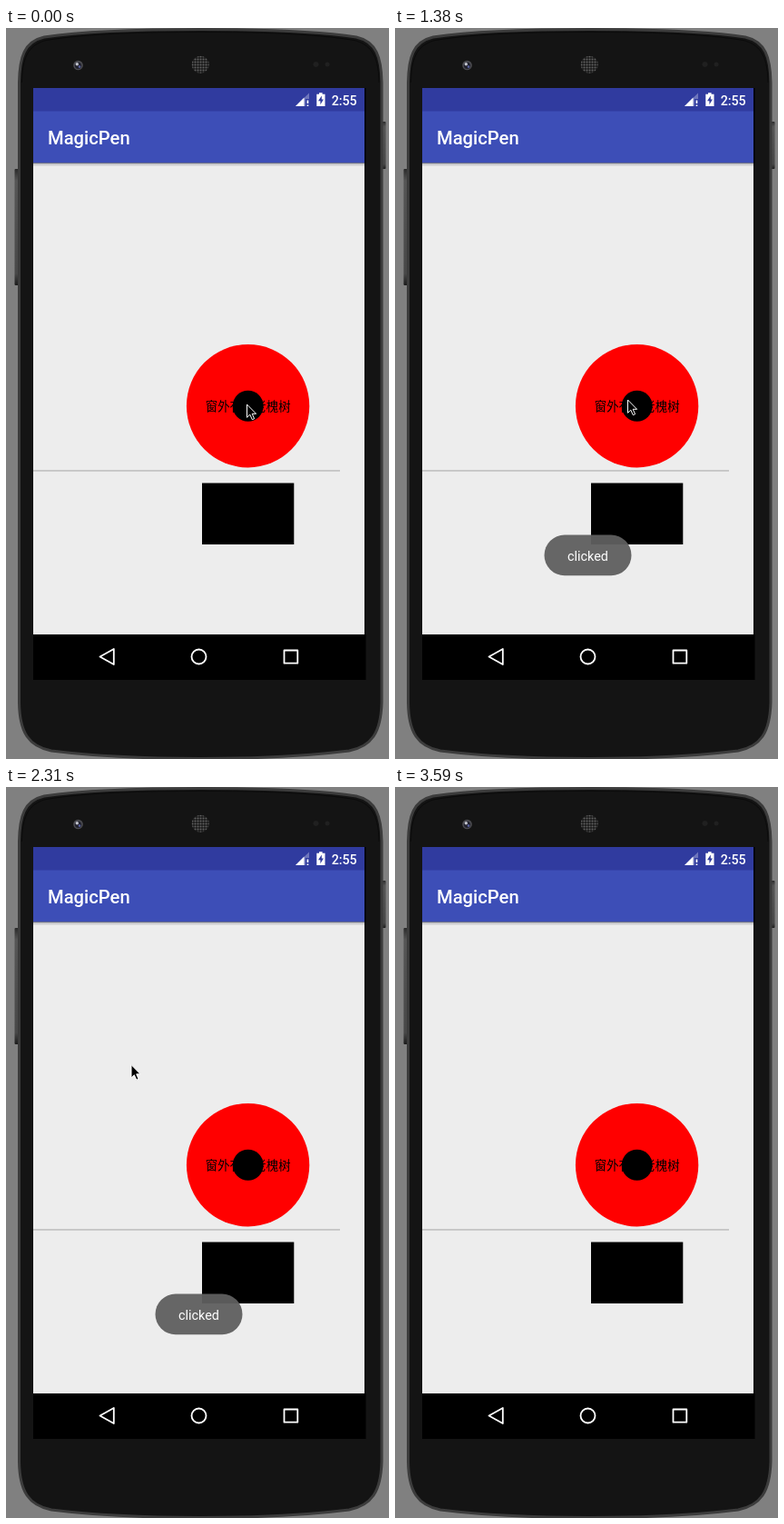
Write an HTML page that moves like this. It is 422x804 px and loops after 4.08 s.

```html
<!DOCTYPE html>
<html lang="zh-CN">
<head>
<meta charset="utf-8">
<title>MagicPen</title>
<style>
html, body { margin: 0; width: 100%; height: 100%; overflow: hidden; background: #808080; }
svg { display: block; width: 100vw; height: 100vh; }
text { font-family: Roboto, sans-serif; fill: #fff; }
.label { font-family: "Noto Sans CJK SC", "Noto Sans CJK", sans-serif; font-size: 13.4px; fill: #000; }
.icon { fill: none; stroke: #fff; stroke-width: 1.8; stroke-linejoin: round; }
</style>
</head>
<body>
<svg viewBox="0 0 422 804" preserveAspectRatio="none">
  <defs>
    <linearGradient id="shade" x2="0" y2="1">
      <stop offset="0" stop-color="#b2b2b6"/>
      <stop offset="1" stop-color="#ededed"/>
    </linearGradient>
    <linearGradient id="key" x2="0" y2="1">
      <stop offset="0" stop-color="#2a2a2a"/>
      <stop offset=".1" stop-color="#555"/>
      <stop offset=".9" stop-color="#484848"/>
      <stop offset="1" stop-color="#1c1c1c"/>
    </linearGradient>
    <pattern id="mesh" width="3" height="3" patternUnits="userSpaceOnUse">
      <rect width="3" height="3" fill="#1a1a1a"/>
      <circle cx="1.5" cy="1.5" r="1.05" fill="#606060"/>
    </pattern>
  </defs>

  <rect width="422" height="804" fill="#808080"/>
  <rect x="9.5" y="155" width="6" height="128" rx="1" fill="url(#key)"/>
  <rect x="413" y="103" width="5.5" height="52" rx="1" fill="url(#key)"/>
  <path d="M14.5 60C15 32 20 15 42 10C90 3 150 1.500 214 1.500S338 3 386 10C408 15 413.500 32 414 60V742C413 775 403 790 378 795C330 801 280 803.500 214 803.500S98 801 50 795C25 790 15 775 14.500 742Z" fill="#141414" stroke="#3c3c3c" stroke-width="3"/>
  <path d="M17.500 60C18 35 23 19 44 13.500C92 6 150 4.500 214 4.500S336 6 384 13.500C405 19 410.500 35 411 60" fill="none" stroke="#0b0b0b"/>

  <circle cx="79.500" cy="41" r="5.300" fill="#4b4b50"/>
  <circle cx="79.500" cy="41.300" r="3.600" fill="#20212d"/>
  <circle cx="78.300" cy="39.800" r="1.700" fill="#c3c5ce"/>
  <circle cx="81" cy="42.600" r="1.300" fill="#5a62a0"/>
  <circle cx="214.200" cy="40.300" r="9.500" fill="url(#mesh)"/>
  <circle cx="341.500" cy="40" r="3" fill="#202020"/>
  <circle cx="354" cy="40" r="2.500" fill="#202020"/>

  <rect x="30" y="66" width="366.500" height="651" fill="#000"/>
  <rect x="30" y="149" width="365" height="518" fill="#ededed"/>
  <rect x="30" y="66" width="365" height="26" fill="#303b9f"/>
  <rect x="30" y="91.500" width="365" height="57" fill="#3d4eb7"/>
  <rect x="30" y="148.500" width="365" height="4" fill="url(#shade)"/>
  <text x="46" y="127.500" font-size="20.200" font-weight="500">MagicPen</text>
  <text x="358.700" y="84.500" font-size="14.200" font-weight="500">2:55</text>

  <path d="M319 86L334 71.500V78H330V86Z" fill="#fff" opacity=".3"/>
  <path d="M319 86L328.500 76.500V86Z" fill="#fff"/>
  <path d="M331.600 79.500h1.700v3.600h-1.700zM331.600 84.400h1.700v1.600h-1.700z" fill="#fff"/>
  <path d="M342.300 72.800H345V71.200H348.600V72.800H351.500V86H342.300Z" fill="#fff"/>
  <path d="M347.800 74.500L344 80.300H346.400V84.300L349.900 78.600H347.800Z" fill="#303b9f"/>

  <g class="icon">
    <path d="M103.500 691.500L118.800 683V700Z"/>
    <circle cx="212.500" cy="691.500" r="8"/>
    <rect x="306.500" y="684.500" width="14.800" height="14.200"/>
  </g>

  <rect x="30" y="486.300" width="338" height="1.300" fill="#b6b6b6"/>
  <rect x="216" y="500.500" width="101.300" height="67.500" fill="#000"/>
  <circle cx="266.600" cy="415.700" r="67.700" fill="#f00"/>
  <text class="label" x="219.800" y="420.500">窗外有棵老槐树</text>
  <circle id="ball" r="17" fill="#000"/>

  <g id="toast">
    <rect x="164.500" y="557.500" width="96" height="44.800" rx="22.400" fill="#5f5f5f" fill-opacity=".95"/>
    <text x="190" y="586" font-size="14.400">clicked</text>
  </g>
  <path id="cursor" d="M.5 1V15.300L3.800 12.200L6.300 17.700L8.600 16.700L6.200 11.300H10.600Z" fill="#000" stroke="#fff"/>
</svg>
<script>
const LOOP = 4080;
const HOME = [266.7, 415.8];
const GRIP = [3.8, 2.8];
// Bursts of screen updates: start, end, number of steps
const BURSTS = [[350, 660, 6], [1380, 1830, 9], [1950, 2430, 9], [2490, 2960, 9], [3020, 3530, 10]];

const $ = id => document.getElementById(id);
const ball = $('ball'), toast = $('toast'), cursor = $('cursor');

const clamp = u => Math.min(1, Math.max(0, u));
const part = (t, a, b) => clamp((t - a) / (b - a));
const linear = u => u;
const smooth = u => (1 - Math.cos(Math.PI * u)) / 2;
const settle = u => 1 - (1 - u) ** 2;
const mix = (p, q, u) => p.map((v, i) => v + (q[i] - v) * u);

// Each leg eases from the previous point: start, end, target, easing
const LEGS = [
  [1379, 1380, [256, 408], linear],
  [1380, 1773, [134, 301], smooth],
  [1773, 1830, [133.5, 299.8], linear],
  [1950, 2250, [137.5, 304.5], smooth],
  [2430, 2960, [256, 420.5], smooth],
  [2960, 3076, [268, 449], u => u ** 1.15],
  [3076, 3530, [384, 801], u => 0.4 * u + 0.6 * smooth(u)]
];

function snap(t) {
  let last = 0;
  for (const [a, b, n] of BURSTS) {
    if (t < a) break;
    const step = (b - a) / (n - 1);
    last = a + Math.min(n - 1, Math.floor((t - a) / step + 0.001)) * step;
  }
  return last;
}

function cursorAt(t) {
  let p = [265, 413];
  for (const [a, b, to, ease] of LEGS) {
    if (t < a) break;
    p = mix(p, to, ease(part(t, a, b)));
  }
  return p;
}

function ballAt(t) {
  if (t <= 1380) return HOME;
  const held = cursorAt(Math.min(t, 1830)).map((v, i) => v + GRIP[i]);
  return mix(held, HOME, smooth(part(t, 1920, 2250)));
}

function toastAt(t) {
  return settle(part(t, 310, 660)) * (1 - part(t, 2340, 2840) ** 2);
}

function draw(time) {
  const t = snap(time);
  const [bx, by] = ballAt(t);
  ball.setAttribute('cx', bx);
  ball.setAttribute('cy', by);
  toast.setAttribute('opacity', toastAt(t));
  cursor.setAttribute('transform', `translate(${cursorAt(t)})`);
  cursor.setAttribute('visibility', time < 3590 ? 'visible' : 'hidden');
}

const start = performance.now();
function tick() {
  draw((performance.now() - start) % LOOP);
  requestAnimationFrame(tick);
}
tick();
</script>
</body>
</html>
```
